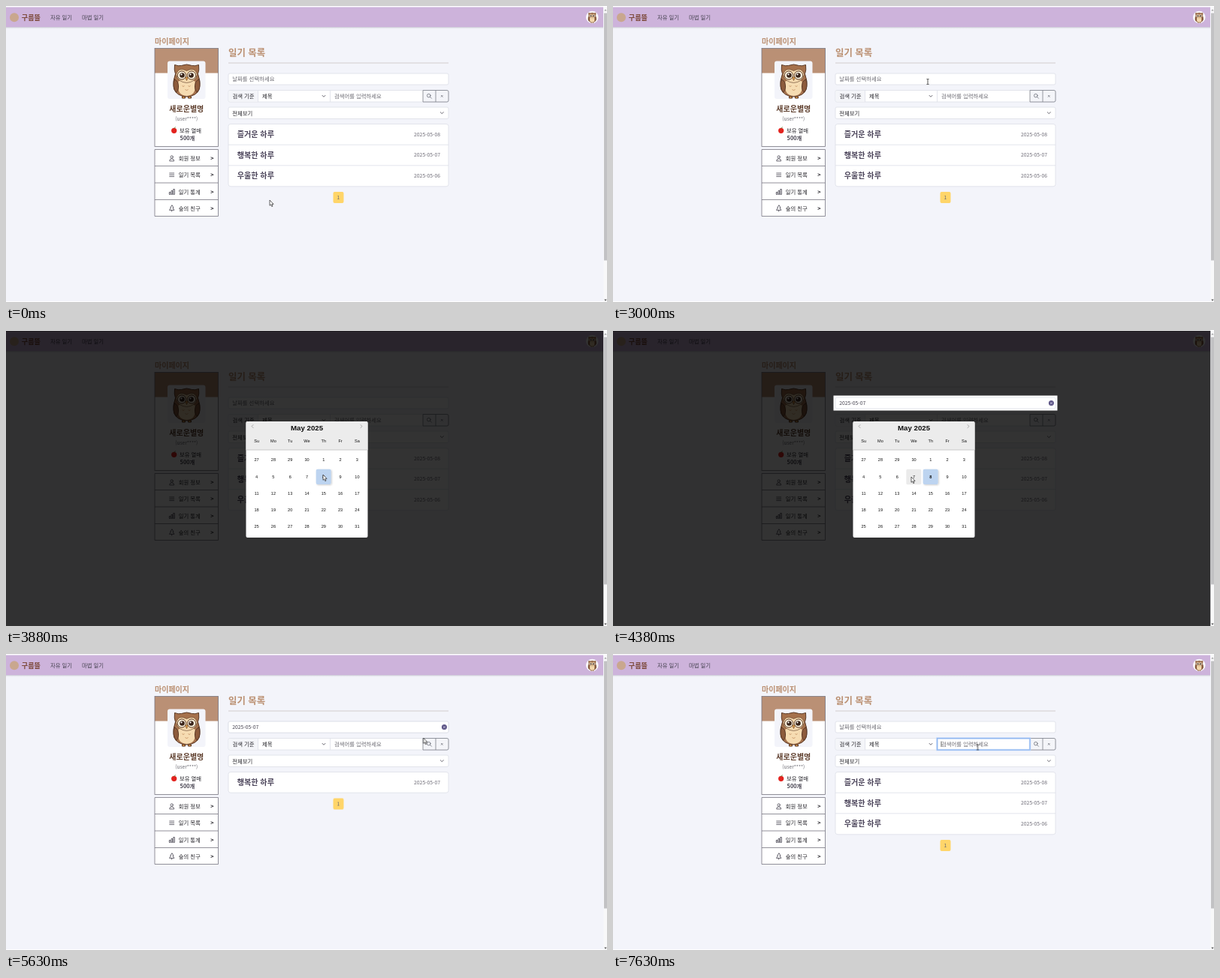
These frames come from a looping animation (800 by 395 pixels, 8000 ms). An HTML page:

```html
<!DOCTYPE html>
<html lang="ko">
<head>
<meta charset="utf-8">
<title>일기 목록</title>
<style>
html, body { margin: 0; width: 100%; height: 100%; overflow: hidden; background: #f3f4fa; }
svg { display: block; width: 100vw; height: 100vh; }
text { font: 7.35px "Noto Sans CJK KR", "Noto Sans CJK", sans-serif; fill: #45424f; white-space: pre; }
.brand { font-size: 9.1px; font-weight: 700; fill: #7a4636; }
.heading { font-size: 10px; font-weight: 700; fill: #bb9072; }
.title { font-size: 12.4px; font-weight: 700; fill: #bb9072; }
.name { font-size: 10px; font-weight: 700; fill: #60402f; }
.item { font-size: 10.1px; font-weight: 700; fill: #4a4359; }
.date { font-size: 6.8px; fill: #6c6a75; text-anchor: end; }
.value { font-size: 6.8px; }
.hint { fill: #6b6a72; }
.dark { fill: #26252b; }
.mid { text-anchor: middle; }
.bold { font-weight: 700; }
.field { fill: #fff; stroke: #dcdfe7; stroke-width: .8; }
.icon { fill: none; stroke: #45424f; stroke-width: .8; stroke-linecap: round; stroke-linejoin: round; }
.calendar text { font: 5.6px "Liberation Sans", Arial, sans-serif; fill: #111; text-anchor: middle; }
.calendar .month { font-size: 9.7px; font-weight: 700; }
.calendar .today { font-weight: 700; }

.timed { animation: 8s step-end infinite; }
#full, #hint { animation-name: full; }
#filtered { animation-name: filtered; }
#hint { animation-name: hint; }
#value { animation-name: value; }
#popup { animation-name: popup; }
#spot { animation-name: spot; }
#hover { animation-name: hover; }
#caret { animation-name: caret; }
#focus { animation-name: focus; }
#arrow { animation-name: arrow; }
#beam { animation-name: beam; }
#pager { animation-name: pager; }
#pointer { animation: pointer 8s linear infinite; }

@keyframes full { 0% { opacity: 1 } 56.25% { opacity: 0 } 78.125% { opacity: 1 } }
@keyframes filtered { 0% { opacity: 0 } 56.25% { opacity: 1 } 78.125% { opacity: 0 } }
@keyframes pager { 0% { transform: none } 56.25% { transform: translateY(-55.5px) } 78.125% { transform: none } }
@keyframes hint { 0% { opacity: 1 } 54.6875% { opacity: 0 } 78.125% { opacity: 1 } }
@keyframes value { 0% { opacity: 0 } 54.6875% { opacity: 1 } 78.125% { opacity: 0 } }
@keyframes popup { 0% { opacity: 0 } 39.0625% { opacity: 1 } 56.25% { opacity: 0 } }
@keyframes spot { 0% { opacity: 0 } 54.6875% { opacity: 1 } 56.25% { opacity: 0 } }
@keyframes hover { 0% { opacity: 0 } 51.5625% { opacity: 1 } 56.25% { opacity: 0 } }
@keyframes caret {
  0% { opacity: 0 } 39.0625% { opacity: 1 } 45.3125% { opacity: 0 } 51.5625% { opacity: 1 }
  54.6875% { opacity: 0 } 78.125% { opacity: 1 } 84.375% { opacity: 0 } 90.625% { opacity: 1 } 93.75% { opacity: 0 }
}
@keyframes focus { 0% { opacity: 0 } 93.75% { opacity: .5 } 95.3125% { opacity: 1 } }
@keyframes arrow { 0% { opacity: 1 } 35.9375% { opacity: 0 } 39.0625% { opacity: 1 } 78.125% { opacity: 0 } }
@keyframes beam { 0% { opacity: 0 } 35.9375% { opacity: 1 } 39.0625% { opacity: 0 } 78.125% { opacity: 1 } }
/* one step every 125 ms */
@keyframes pointer {
  0%, 4.6875% { transform: translate(351px, 259px); animation-timing-function: steps(5) }
  12.5%, 14.0625% { transform: translate(366px, 261px); animation-timing-function: steps(3) }
  18.75% { transform: translate(395px, 291px); animation-timing-function: steps(4) }
  25% { transform: translate(440px, 214px); animation-timing-function: steps(4) }
  31.25% { transform: translate(616px, 150px); animation-timing-function: steps(3) }
  35.9375%, 42.1875% { transform: translate(419px, 101px); animation-timing-function: steps(4) }
  48.4375% { transform: translate(422px, 193px); animation-timing-function: steps(3) }
  53.125%, 60.9375% { transform: translate(397px, 196px); animation-timing-function: steps(7) }
  71.875% { transform: translate(582px, 98px); animation-timing-function: steps(4) }
  78.125%, 82.8125% { transform: translate(585px, 97px); animation-timing-function: steps(5) }
  90.625%, 100% { transform: translate(485.5px, 124.5px) }
}
</style>
</head>
<body>
<svg viewBox="0 0 800 395">
  <defs>
    <symbol id="owl" viewBox="0 0 50 50" overflow="visible">
      <g stroke="#5a3926" stroke-width="1" stroke-linejoin="round">
        <path d="M19 47v2.500h4v-2zM27 47v2.500h4v-2z" fill="#e9a04b"/>
        <path d="M9 5Q14 7 18 6Q25 3 32 6Q36 7 41 5Q42 12 40 17Q44 27 42 37Q38 47 25 47.500Q12 47 8 37Q6 27 10 17Q8 12 9 5Z" fill="#a5714c"/>
        <path d="M14 27Q25 22 36 27Q39 46 25 46.500Q11 46 14 27Z" fill="#f6dcb2" stroke="none"/>
        <path d="M25 13Q14 7 11 18Q13 28 25 29Q37 28 39 18Q36 7 25 13Z" fill="#f5d9ae" stroke-width=".6"/>
        <path d="M9 24Q5 34 11 42Q16 37 13 28ZM41 24Q45 34 39 42Q34 37 37 28Z" fill="#8d5b3c"/>
        <circle cx="18.500" cy="19" r="5.600" fill="#fff4df"/>
        <circle cx="31.500" cy="19" r="5.600" fill="#fff4df"/>
        <path d="M23 21.500h4l-2 4.500z" fill="#eda443" stroke-width=".6"/>
        <path d="M19 33q1.500 2 3 0M27 33q1.500 2 3 0M23 38q2 2 4 0" fill="none" stroke="#c08b5c" stroke-width=".8"/>
      </g>
      <g fill="#3a251b"><circle cx="19" cy="19" r="3.300"/><circle cx="31" cy="19" r="3.300"/></g>
      <g fill="#fff"><circle cx="18" cy="17.800" r="1.100"/><circle cx="30" cy="17.800" r="1.100"/></g>
    </symbol>
    <path id="chevron" class="icon" d="M-2-1L0 1L2-1"/>
    <clipPath id="round"><circle cx="780.300" cy="15" r="8.300"/></clipPath>
    <linearGradient id="shade" x2="0" y2="1">
      <stop stop-color="#b9b5c4" stop-opacity=".8"/><stop offset="1" stop-color="#f3f4fa" stop-opacity="0"/>
    </linearGradient>
    <filter id="soft" x="-30%" y="-30%" width="160%" height="160%"><feDropShadow dx="1" dy="1" stdDeviation=".8" flood-opacity=".2"/></filter>
  </defs>

  <rect width="800" height="395" fill="#f3f4fa"/>
  <path d="M0 0H800V1.500H0ZM0 394H800V395H0Z" fill="#fff"/>

  <!-- navigation -->
  <rect y="28" width="795" height="3" fill="url(#shade)"/>
  <rect y="1.500" width="795" height="26.500" fill="#cdb3db"/>
  <circle cx="11" cy="15.200" r="6" fill="#c9a78e"/>
  <text class="brand" x="20.800" y="18.500">구름뜰</text>
  <text x="59" y="17.900">자유 일기</text>
  <text x="101" y="17.900">마법 일기</text>
  <circle cx="780.300" cy="15" r="8.300" fill="#fbf9fb"/>
  <g clip-path="url(#round)"><use href="#owl" x="772.800" y="7.600" width="15" height="15"/></g>

  <!-- profile -->
  <text class="heading" x="198" y="51">마이페이지</text>
  <rect x="198" y="56.500" width="84.500" height="131" fill="#fff"/>
  <rect x="198" y="56.500" width="84.500" height="33" fill="#ba9075"/>
  <rect x="198" y="56.500" width="84.500" height="131" fill="none" stroke="#777580" stroke-width=".8"/>
  <rect x="215" y="73.500" width="50.500" height="50.500" rx="3" fill="#f3f4fa"/>
  <use href="#owl" x="215.500" y="73.500" width="50" height="50"/>
  <text class="name mid" x="240.300" y="141.300">새로운별명</text>
  <text class="mid hint" x="240.300" y="152.800" style="font-size:6.600px">(user****)</text>
  <circle cx="223.700" cy="166.300" r="3.600" fill="#e3231f"/>
  <path class="icon" d="M223.500 163.500q.500-1.500 2-1.800" style="stroke:#5d7a35"/>
  <text class="dark" x="231" y="168.800">보유 열매</text>
  <text class="mid bold" x="241.500" y="178.700">500개</text>

  <!-- side menu -->
  <path d="M198 191.500H282.500V280.500H198ZM198 213.500H282.500M198 236H282.500M198 258.500H282.500" fill="#fff" stroke="#777580" stroke-width=".8"/>
  <g id="menu"></g>
  <g class="icon">
    <circle cx="220.700" cy="201.500" r="1.700"/><path d="M217.700 206.500q0-2.700 3-2.700t3 2.700z"/>
    <path d="M217.700 223h6M217.700 225.300h6M217.700 227.600h6"/>
    <path d="M217.300 251v-2.500h1.700v2.500zM220 251v-4.500h1.700v4.500zM222.700 251v-6.500h1.700v6.500z"/>
    <path d="M220.700 266l-2 3.200h.8l-2 3.200h6.400l-2-3.200h.8zM220.700 272.400v1.800"/>
  </g>

  <!-- diary search -->
  <text class="title" x="296" y="66.600">일기 목록</text>
  <path d="M296 76H589" stroke="#c9c1c2" stroke-width=".8"/>
  <rect class="field" x="296" y="90" width="293" height="15" rx="2"/>

  <rect class="field" x="296" y="112.500" width="293" height="15.500" rx="2"/>
  <rect x="296.500" y="113" width="39" height="14.500" rx="1.500" fill="#f4f5f9"/>
  <path d="M335.500 112.500V128M431.500 112.500V128" stroke="#dcdfe7" stroke-width=".8"/>
  <text class="dark" x="301.500" y="122.900">검색 기준</text>
  <text class="dark" x="341" y="122.900">제목</text>
  <use href="#chevron" x="423" y="120.300"/>
  <text class="hint" x="437" y="122.900">검색어를 입력하세요</text>
  <path d="M555 112.500H587Q589 112.500 589 114.500V126Q589 128 587 128H555ZM572 112.500V128" fill="#f4f5f9" stroke="#7b7f8a" stroke-width=".8"/>
  <g class="icon" style="stroke:#6c707a">
    <circle cx="562.800" cy="119.600" r="2.300"/><path d="M564.500 121.300l2 2M579.300 119.300l2 2M581.300 119.300l-2 2"/>
  </g>
  <g id="focus" class="timed">
    <rect x="431.500" y="112.500" width="123.500" height="15.500" fill="none" stroke="#bcd4f8" stroke-width="2.400"/>
    <rect x="431.500" y="112.500" width="123.500" height="15.500" fill="none" stroke="#86b0ee" stroke-width=".8"/>
    <path d="M437 116.500v7.500" stroke="#222" stroke-width=".7"/>
  </g>

  <rect class="field" x="296" y="135" width="293" height="15.500" rx="2"/>
  <text class="dark" x="301.300" y="145.500">전체보기</text>
  <use href="#chevron" x="580.300" y="142.700"/>

  <!-- entries -->
  <g id="full" class="timed">
    <rect class="field" x="296" y="157.500" width="293" height="83.300" rx="3"/>
    <path class="field" d="M296 185.200H589M296 212.800H589"/>
    <text class="item" x="307.700" y="175">즐거운 하루</text><text class="date" x="578" y="173.500">2025-05-08</text>
    <text class="item" x="307.700" y="202.600">행복한 하루</text><text class="date" x="578" y="201.100">2025-05-07</text>
    <text class="item" x="307.700" y="230.300">우울한 하루</text><text class="date" x="578" y="228.800">2025-05-06</text>
  </g>
  <g id="filtered" class="timed">
    <rect class="field" x="296" y="157.500" width="293" height="27.700" rx="3"/>
    <text class="item" x="307.700" y="175">행복한 하루</text><text class="date" x="578" y="173.500">2025-05-07</text>
  </g>
  <g id="pager" class="timed">
    <rect x="435.500" y="248" width="14" height="15" rx="2" fill="#ffd569"/>
    <text class="mid hint" x="442.500" y="258" style="font-size:6.800px">1</text>
  </g>

  <text id="hint" class="hint timed" x="301.300" y="100.300">날짜를 선택하세요</text>
  <path id="caret" class="timed" d="M302 93.500v8" stroke="#222" stroke-width=".7"/>

  <!-- calendar -->
  <g id="popup" class="timed calendar">
    <rect y="1" width="795.500" height="394" opacity=".8"/>
    <rect x="319.500" y="122" width="162" height="155" rx="2" fill="#fff"/>
    <path d="M319.500 160V124q0-2 2-2H479.500q2 0 2 2V160Z" fill="#ececec"/>
    <path d="M319.500 160H481.500" stroke="#bdbdbd" stroke-width=".8"/>
    <path class="icon" d="M329 126.500l-2 2l2 2M472 126.500l2 2l-2 2" style="stroke:#999"/>
    <text class="month" x="400.500" y="134.300">May 2025</text>
    <rect id="hover" class="timed" x="390.300" y="185.700" width="20" height="20.500" rx="2" fill="#ebebeb"/>
    <rect x="412.700" y="185.700" width="20" height="20.300" rx="2" fill="#bdd4f0" filter="url(#soft)"/>
    <g id="days"></g>
  </g>
  <rect id="spot" class="timed" x="293.500" y="87.500" width="298" height="20" fill="#fff"/>
  <g id="value" class="timed">
    <rect class="field" x="296" y="90" width="293" height="15" rx="2"/>
    <text class="value" x="301.300" y="100">2025-05-07</text>
    <circle cx="583.400" cy="97.600" r="3.500" fill="#5c5486"/>
    <path class="icon" d="M582.300 96.500l2.200 2.200M584.500 96.500l-2.200 2.200" style="stroke:#d8d5e8"/>
  </g>

  <!-- scrollbar -->
  <rect x="795.500" y="1" width="4.500" height="394" fill="#f8f8f9"/>
  <rect x="796" y="9.500" width="4" height="330" fill="#c2c2c4"/>
  <path d="M796.300 6.500l1.700-2.200l1.700 2.200z" fill="#a3a3a3"/><path d="M796.300 391.500l1.700 2.200l1.700-2.200z" fill="#555"/>

  <g id="pointer">
    <path id="arrow" class="timed" d="M0 0V7.300L1.600 5.900L2.800 8.600L4 8.100L2.900 5.400H5.100Z" fill="#fff" stroke="#222" stroke-width=".7"/>
    <path id="beam" class="timed" d="M-1.500-3.500H-.4L0-3L.4-3.500H1.500M0-3V3M-1.500 3.500H-.4L0 3L.4 3.500H1.500" fill="none" stroke="#222" stroke-width=".8"/>
  </g>
</svg>
<script>
const addText = (parent, x, y, content, className = "") => {
  const node = document.createElementNS("http://www.w3.org/2000/svg", "text");
  node.setAttribute("x", x);
  node.setAttribute("y", y);
  node.setAttribute("class", className);
  node.textContent = content;
  parent.append(node);
};

const menu = document.getElementById("menu");
["회원 정보", "일기 목록", "일기 통계", "숲의 친구"].forEach((label, i) => {
  const y = 206 + i * 22.4;
  addText(menu, 229.7, y, label, "dark");
  addText(menu, 272.3, y, ">", "dark bold");
});

const days = document.getElementById("days");
const columnX = i => 333.6 + (i % 7) * 22.3;
["Su", "Mo", "Tu", "We", "Th", "Fr", "Sa"].forEach((day, i) => addText(days, columnX(i), 150, day));
for (let i = 0; i < 35; i++) {
  const day = i < 4 ? 27 + i : i - 3;
  addText(days, columnX(i), 175.2 + Math.floor(i / 7) * 22.3, day, i === 11 ? "today" : "");
}
</script>
</body>
</html>
```
